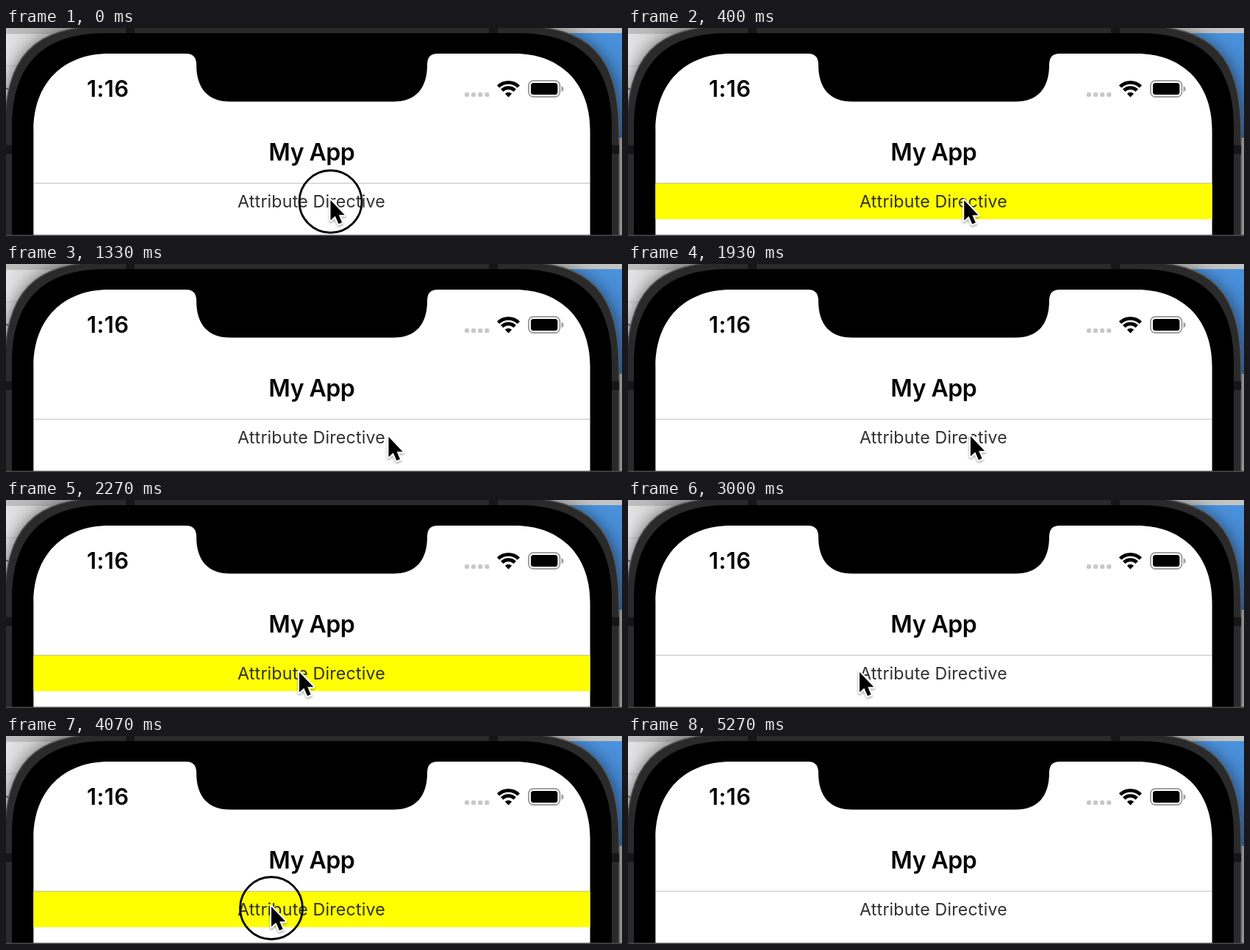
Recreate the animation shown at these times as an HTML page. Size 838 by 284 pixels, loop 5330 ms.

```html
<!DOCTYPE html>
<html lang="en">
<head>
<meta charset="utf-8">
<title>Attribute Directive</title>
<style>
  html, body { margin: 0; width: 100%; height: 100%; overflow: hidden; background: #ccc; }
  svg { display: block; width: 838px; height: 284px; }
  text { font-family: Inter, "Liberation Sans", sans-serif; text-anchor: middle; }
  .bold { font-weight: 600; fill: #050505; }
  .clock { font-size: 30.8px; letter-spacing: .5px; }
  .title { font-size: 32px; letter-spacing: -.5px; }
  .label { font-size: 23.2px; letter-spacing: .19px; fill: #303030; }
</style>
</head>
<body>
<svg viewBox="0 0 838 284" xmlns="http://www.w3.org/2000/svg">
  <defs>
    <linearGradient id="wall" x2="1" y2="0">
      <stop offset="0" stop-color="#e4e4e4"/>
      <stop offset="1" stop-color="#a0a0a0"/>
    </linearGradient>
    <linearGradient id="sky" x2="0" y2="1">
      <stop offset="0" stop-color="#4a92dc"/>
      <stop offset="1" stop-color="#4079c0"/>
    </linearGradient>
    <filter id="phoneShadow" x="-10%" y="-20%" width="120%" height="140%">
      <feDropShadow dx="0" dy="4" stdDeviation="12" flood-opacity=".6"/>
    </filter>
    <filter id="shadow" x="-50%" y="-30%" width="220%" height="180%">
      <feDropShadow dx="0" dy="2" stdDeviation="1.6" flood-opacity=".35"/>
    </filter>
  </defs>

  <!-- desktop -->
  <rect width="838" height="284" fill="#c4c4c4"/>
  <rect width="170" height="150" fill="url(#wall)"/>
  <rect width="170" height="8" fill="#999" opacity=".5"/>
  <rect y="51" width="40" height="2" fill="#d2d2d2"/>
  <path d="M0 82Q5 84 4 91Q4 98 0 101" fill="none" stroke="#555" stroke-width="1.5"/>
  <rect x="700" width="138" height="7" fill="#c4c4c2"/>
  <rect x="700" y="7" width="138" height="143" fill="url(#sky)"/>

  <!-- phone body -->
  <path d="M-2 290V145C-2 38 36-3 140-3H692C796-3 834 38 834 145V290Z" fill="#2b2b2b" stroke="#555" stroke-width="1.5" filter="url(#phoneShadow)"/>
  <path d="M-2 160h10v12h-10zM824 160h10v12h-10zM163 0h12v7h-12zM657 0h12v7h-12z" fill="#161616"/>
  <path d="M8 290V135C8 50 50 7 135 7H697C782 7 824 50 824 135V290Z"/>

  <!-- screen with notch -->
  <path d="M37.4 290V140C37.4 75 78 35 140 35H245Q259 35 259 50C259 83 275 100.5 305 100.5H527C557 100.5 573 83 573 50Q573 35 587 35H692C754 35 794.6 75 794.6 140V290Z" fill="#fff"/>

  <!-- status bar -->
  <text class="bold clock" x="138.8" y="93.8">1:16</text>
  <g id="dots" fill="#c8c8c8"></g>
  <g id="wifi" fill="none" stroke="#000" stroke-width="4.8"></g>
  <rect x="711" y="72" width="42.4" height="22" rx="6.5" fill="none" stroke="#a0a0a0" stroke-width="2"/>
  <rect x="714" y="75" width="36.4" height="16" rx="3.5"/>
  <path d="M755.6 79.5Q758.6 80.5 758.6 83.2T755.6 87Z" fill="#a0a0a0"/>

  <!-- page -->
  <text class="bold title" x="415.8" y="181">My App</text>
  <rect id="highlight" x="37.4" y="212" width="757.2" height="49" fill="#ff0"/>
  <rect x="37.4" y="211.5" width="757.2" height="1.1" fill="#8c8c8c" opacity=".55"/>
  <text class="label" x="415.6" y="244.5">Attribute Directive</text>
  <rect y="282.4" width="838" height="1.6" fill="#4a4648"/>

  <g id="pointer">
    <circle id="ring" cy="2" r="42.5" fill="none" stroke="#000" stroke-width="2.8"/>
    <path d="M0 0V27.5L6.3 21.8L11 32.5L15.6 30.5L11.2 20.2H19.2Z" stroke="#fff" stroke-width="4"
          stroke-linejoin="round" paint-order="stroke" filter="url(#shadow)"/>
  </g>
</svg>
<script>
const LOOP = 5330;
const GONE = 4900;
const byId = id => document.getElementById(id);
const [highlight, pointer, ring] = ["highlight", "pointer", "ring"].map(byId);

// Each move: start, end, then the position reached.
const origin = [441.5, 235];
const moves = [
  [260, 750, 521, 236],
  [1300, 1820, 466, 235],
  [2110, 2260, 399, 235],
  [2740, 2990, 315, 235],
  [3570, 3860, 361, 233],
  [4480, GONE, 560, -60]
];
// Each tap: press, release. The highlight toggles on release.
const taps = [[0, 130], [1000, 1130], [1960, 2090], [2570, 2700], [3400, 3530], [4000, 4130]];

const ease = p => p * p * (3 - 2 * p);
const clamp = v => Math.min(1, Math.max(0, v));

function pointerAt(t) {
  let [x, y] = origin;
  for (const [start, end, toX, toY] of moves) {
    const p = ease(clamp((t - start) / (end - start)));
    x += (toX - x) * p;
    y += (toY - y) * p;
  }
  return [x, y];
}

function show(element, visible) {
  element.setAttribute("visibility", visible ? "visible" : "hidden");
}

function draw(t) {
  const released = taps.filter(([, up]) => t >= up).length;
  show(highlight, released % 2);
  show(pointer, t < GONE);
  show(ring, t < GONE && taps.some(([down, up]) => t >= down && t < up));
  pointer.setAttribute("transform", `translate(${pointerAt(t)})`);
}

byId("dots").innerHTML = [0, 1, 2, 3]
  .map(i => `<rect x="${624 + i * 9.1}" y="88" width="6" height="6" rx="1.7"/>`).join("");

const arc = r => {
  const d = r * Math.SQRT1_2;
  return `<path d="M${683.5 - d} ${94 - d}A${r} ${r} 0 0 1 ${683.5 + d} ${94 - d}"/>`;
};
byId("wifi").innerHTML = arc(19.6) + arc(12.4) +
  '<path d="M683.5 94.5l-4.6-4.8a6.6 6.6 0 0 1 9.2 0z" fill="#000" stroke="none"/>';

let began;
function tick(now) {
  began ??= now;
  draw((now - began) % LOOP);
  requestAnimationFrame(tick);
}
draw(0);
requestAnimationFrame(tick);
</script>
</body>
</html>
```
